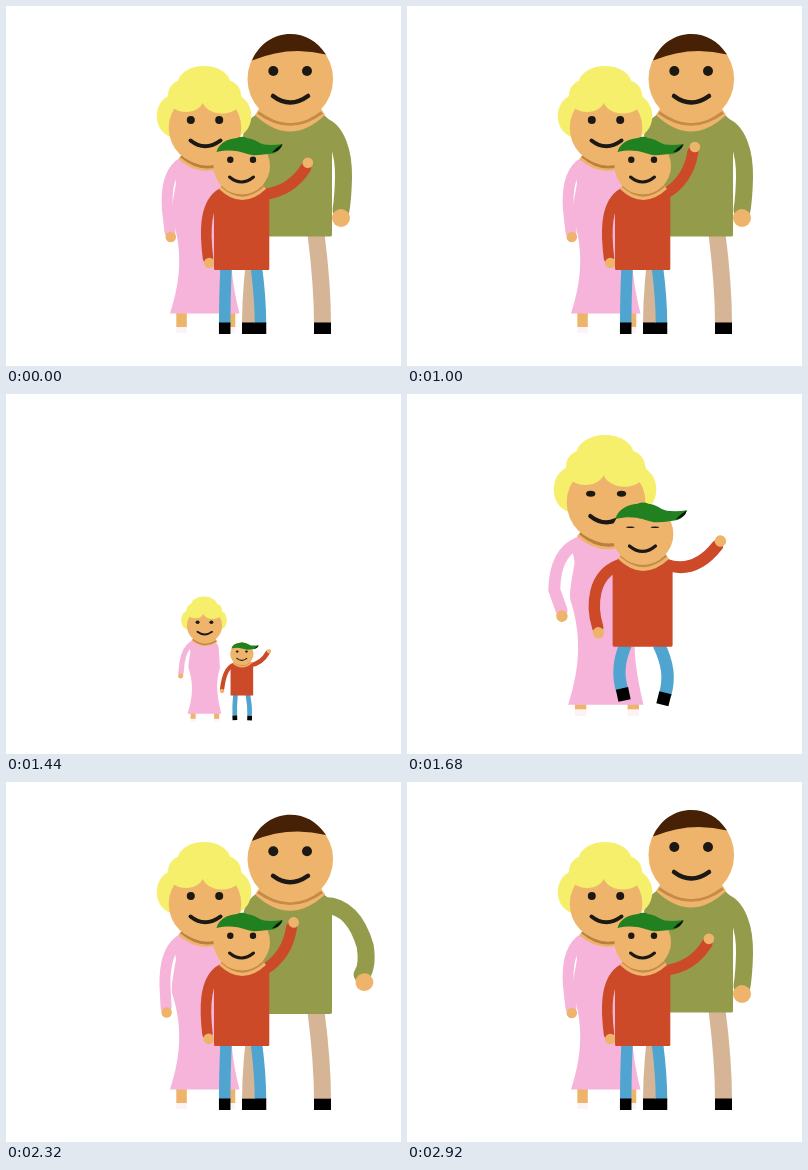
An HTML page for the animation above (2.96 s loop, 395 by 360 pixels).

```html
<!DOCTYPE html>
<html lang="en">
<head>
<meta charset="utf-8">
<title>Waving family</title>
<style>
  html, body { margin: 0; width: 100%; height: 100%; overflow: hidden; background: #fff; }
  svg { display: block; width: 395px; height: 360px; }
</style>
</head>
<body>
<svg id="stage" viewBox="0 0 395 360"></svg>
<script>
const LOOP = 2960, WAVES = 7, GROUND = 328;
const SKIN = '#efb46c', INK = '#1c1914', CREASE = '#b9803f';
const stage = document.getElementById('stage');

// Pop-in curves: [local ms, value]
const WIDTH = [[-60, 0], [120, .82], [240, 1.085], [300, 1.085], [440, 1.02], [540, 1]];
const HEIGHT = [[-60, 0], [120, .8], [240, 1.035], [320, 1.05], [440, 1.01], [560, .984],
  [600, .962], [720, 1.012], [840, 1]];
const SWING = [[0, 15], [160, 0], [240, 3], [290, 6], [420, 45], [520, 37], [560, 17],
  [600, 1], [720, -3], [920, 3.5], [1080, 0]];
const BEND = [[120, 0], [240, 6], [560, 9], [620, 0]];
const TUCK = [[0, 0], [120, 1], [340, 1], [460, 0]];

function track(keys, t) {
  if (t <= keys[0][0]) return keys[0][1];
  for (let i = 1; i < keys.length; i++) {
    const [a, from] = keys[i - 1], [b, to] = keys[i];
    if (t < b) {
      const p = (t - a) / (b - a);
      return from + (to - from) * p * p * (3 - 2 * p);
    }
  }
  return keys[keys.length - 1][1];
}

function poseAt(t, { start, rate = 1, stretch = 1, x, drop, lid }) {
  const local = (t - start) * rate;
  const height = track(HEIGHT, local);
  const tuck = track(TUCK, local);
  return {
    sx: track(WIDTH, local),
    sy: height > 1 ? 1 + (height - 1) * stretch : height,
    swing: track(SWING, local),
    bend: track(BEND, local),
    lid: 1 - (1 - lid) * tuck,
    tuck, x, dy: drop * tuck
  };
}

const shape = (d, fill) => `<path d="${d}" fill="${fill}"/>`;
const line = (d, color, w, cap = 'butt') =>
  `<path d="${d}" fill="none" stroke="${color}" stroke-width="${w}" stroke-linecap="${cap}"/>`;
const oval = (x, y, rx, ry, fill) =>
  `<ellipse cx="${x}" cy="${y}" rx="${rx}" ry="${ry}" fill="${fill}"/>`;
const ball = (x, y, r, fill) => oval(x, y, r, r, fill);
const turn = (deg, x, y, body) => `<g transform="rotate(${deg} ${x} ${y})">${body}</g>`;
const tall = (s, y, body) => `<g transform="translate(0 ${y}) scale(1 ${s}) translate(0 ${-y})">${body}</g>`;
const eyes = (x1, x2, y, r, lid) => [x1, x2].map(x =>
  oval(x, y, r + (1 - lid), r * lid, INK)).join('');
const arm = (d, color, w, [hx, hy, r]) => line(d, color, w, 'round') + ball(hx, hy, r, SKIN);

// bow pushes the knee sideways while the foot is drawn up
function leg(x0, y0, x1, w, color, tuck, { lift, tilt, bow, shift = 0 }) {
  const x = x1 + shift * tuck, y = 317 - lift * tuck, b = bow * tuck;
  return line(`M${x0} ${y0}C${x0 + (x1 - x0) * .7 + b} ${y0 + (y - y0) * .4} ${x1 + b} ${y0 + (y - y0) * .7} ${x} ${y + 1}`, color, w)
    + turn(tilt * tuck, x, y, `<rect x="${x - w / 2}" y="${y - .5}" width="${w}" height="11.5" fill="#000"/>`);
}

function place(p, body) {
  if (p.sx < .001) return '';
  return `<g transform="translate(${p.x} ${GROUND + p.dy}) scale(${p.sx} ${p.sy}) translate(${-p.x} ${-GROUND})">${body}</g>`;
}

function father(p) {
  const shirt = '#949b4a', trousers = '#d6b596', b = p.bend, up = b * .6;
  return place(p,
    leg(252, 228, 244.5, 17, trousers, p.tuck, { lift: 10, tilt: -8, bow: -5, shift: 8 }) +
    leg(310, 228, 316.5, 17, trousers, p.tuck, { lift: 10, tilt: 11, bow: 6, shift: -6 }) +
    tall(1 + .05 * p.tuck, 230,
      turn(-p.swing, 318, 124,
        arm(`M314 119C${331 + b} 123 ${338 + b} 147 ${337.5 + b} 172Q${337 + b * .7} 192 335 ${204 - up}`,
          shirt, 17, [335, 212 - up, 9])) +
      shape('M251 108C244 112 239 119 237 130L240 229Q240 230.500 242 230.500H324Q326 230.500 326 229V121Q324 112 316 108Z', shirt) +
      shape('M249 109Q284 142 319 109L310 95H258Z', SKIN) +
      line('M252 106.500Q284 130 316 106.500', '#c68c47', 3)) +
    tall(1 - .06 * p.tuck, 28,
      oval(284.3, 73, 42.8, 44, SKIN) +
      shape('M246 54.500C253 38 268 28 284.300 28C299 28 311 35 320 48.500Q283 39 246 54.500Z', '#472105') +
      eyes(267.3, 301, 65, 5, p.lid) +
      line('M267 90Q284 103 302 90', INK, 4.5, 'round')));
}

function mother(p) {
  const dress = '#f6b4da', hair = '#f5ef6b', b = p.bend, up = b * .6;
  const foot = x => `<rect x="${x}" y="300" width="10.500" height="21" fill="${SKIN}"/>` +
    `<rect x="${x}" y="321" width="10.500" height="6" fill="#fdf3f5"/>`;
  return place(p,
    `<g transform="translate(0 ${-9 * p.tuck})">${foot(170.3)}${foot(218.8)}</g>` +
    turn(p.swing, 172, 162,
      arm(`M173 159C${163 - b} 168 ${160 - b} 185 ${161.5 - b} 204L164 ${226 - up}`,
        dress, 11, [164.8, 231 - up, 5.3])) +
    shape('M174 152Q169 156 168 166L170 177C168 190 165 202 166 211C175 239 177 268 164 307.500H233.500C224 268 222 239 231 211L228 166L222 154Z', dress) +
    shape('M172 153Q198 176 226 155L218 145H180Z', SKIN) +
    line('M175 150Q198 170 223 154', CREASE, 2.8) +
    oval(168, 110, 17.3, 21, hair) + oval(228, 110, 17.3, 21, hair) +
    ball(199, 122, 36.3, SKIN) +
    oval(198, 78, 26.5, 18, hair) + oval(177, 89, 15, 15, hair) + oval(219, 89, 16, 15, hair) +
    oval(180, 92, 18, 14, hair) + oval(216, 93, 20, 14.5, hair) +
    eyes(184.8, 213.2, 114, 4, p.lid) +
    line('M184.500 134.500Q199 146 214.500 134.500', INK, 4, 'round'));
}

function son(p, wave) {
  const shirt = '#cc4a28', jeans = '#4fa5d0', b = p.bend;
  const hand = [294.5 + 7.7 * wave, 148.5 + 8.7 * wave, 5.3];
  return place(p,
    leg(220, 262, 218.7, 11.5, jeans, p.tuck, { lift: 14, tilt: -12, bow: -6, shift: -2 }) +
    leg(250.5, 262, 254.5, 11.5, jeans, p.tuck, { lift: 10, tilt: 14, bow: 6, shift: 2 }) +
    turn(p.swing, 214, 189,
      arm(`M213 189C${198 - b} 201 ${199 - b} 228 202 ${252 - b * .6}`, shirt, 10.5,
        [203.3, 257 - b * .6, 5.3])) +
    turn(p.swing * 1.5, 258, 188,
      arm(`M257 188.500Q${283 + 2 * wave} ${180 + 6 * wave + b} ${hand[0] - 2} ${hand[1] + 5}`, shirt, 11, hand)) +
    shape('M214 182Q208 186 208 192V262.500Q208 264 209.500 264H262Q263.300 264 263.300 262.500V185L257 182Z', shirt) +
    shape('M213 183Q236 205 260 183L252 172H220Z', SKIN) +
    line('M215.500 180Q236 199 257.500 180', '#c68c47', 2.2) +
    ball(235.7, 160, 28.3, SKIN) +
    shape('M210.500 146C213 137 222 132.500 231 132Q236 129.500 241 132C249 133 252 137 258 138.500Q267 139.500 276.500 138Q273 148 262 148Q252 149.500 246 149C236 147 229 142 210.500 146Z', '#21801f') +
    shape('M266 146.500Q271 141 276.500 138Q275 145 266 146.500Z', '#0b140b') +
    eyes(224.3, 247, 153.8, 3.2, p.lid) +
    line('M223.500 171Q235.500 181 247.500 171', INK, 3, 'round'));
}

function render(time) {
  const t = time % LOOP;
  const leaving = t < 1230;
  const at = leaving ? LOOP : t;
  const opacity = leaving ? Math.max(0, Math.min(1, 1 - (t - 1060) / 165)) : 1;
  const wave = Math.cos((t + 20) / LOOP * WAVES * 2 * Math.PI);
  stage.innerHTML = `<g opacity="${opacity}">` +
    father(poseAt(at, { start: 1760, x: 285, drop: -1.5, lid: .3 })) +
    mother(poseAt(at, { start: 1400, stretch: 2.1, x: 198, drop: 5, lid: .7 })) +
    son(poseAt(at, { start: 1415, rate: 1.15, stretch: 1.7, x: 236, drop: -6, lid: .22 }), wave) +
    '</g>';
}

const begin = performance.now();
function tick() {
  render(performance.now() - begin);
  requestAnimationFrame(tick);
}
render(0);
requestAnimationFrame(tick);
</script>
</body>
</html>
```
